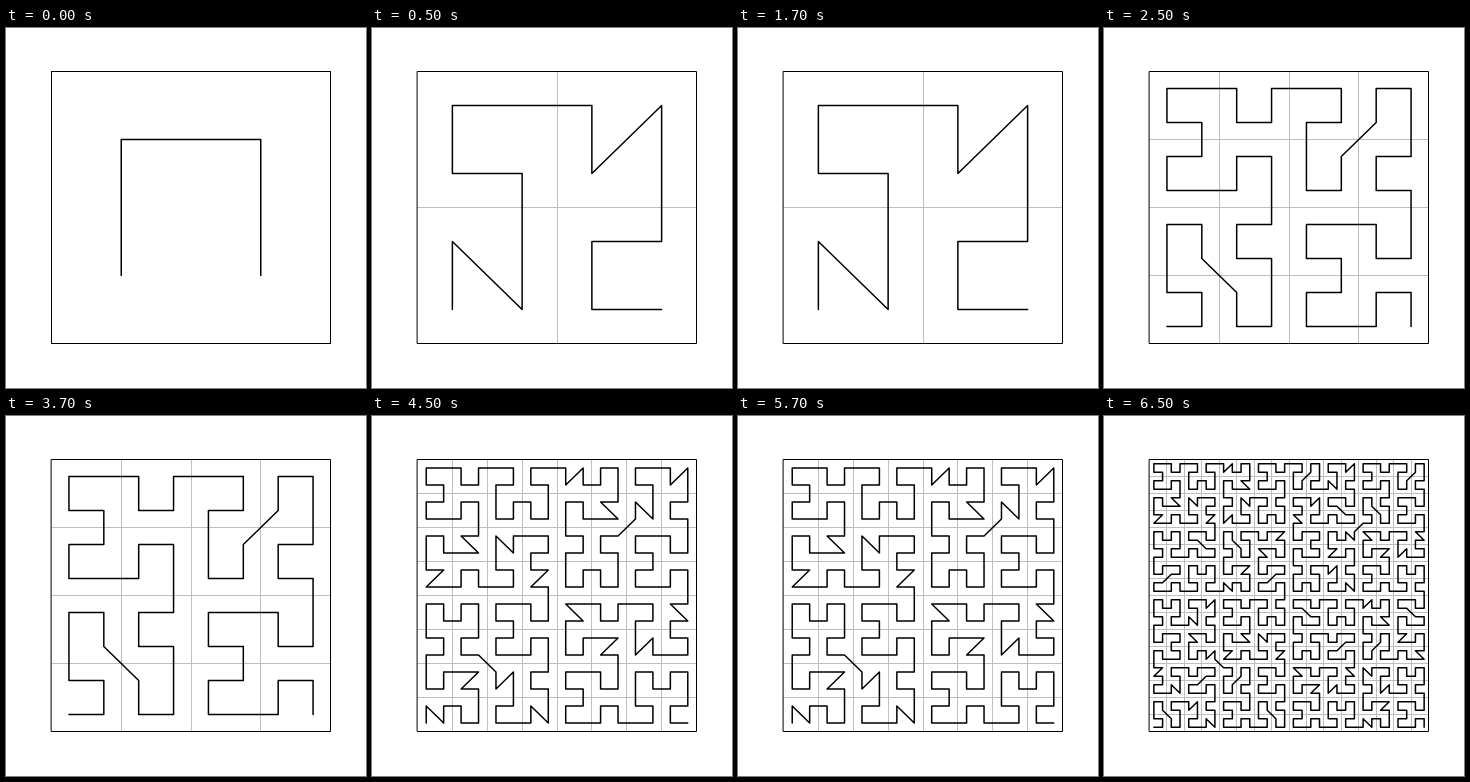
Write an HTML page with a canvas that moves like this. It is 360 px wide and 360 px high and loops after 8000 ms.

```html
<!DOCTYPE html>
<html lang="en">
<head>
<meta charset="utf-8">
<title>Space-filling curve</title>
<style>
  html, body { margin: 0; width: 100%; height: 100%; overflow: hidden; background: #fff; }
  canvas { display: block; }
</style>
</head>
<body>
<canvas id="stage" width="360" height="360"></canvas>
<script>
const ctx = document.getElementById('stage').getContext('2d');
const LOOP = 8000, FIRST = 500, STEP = 2000;
const BOX = { x: 45.5, y: 43.5, w: 279, h: 272 };

// Child rule: pattern, quadrant (u, v), start corner (u, v), x = swap axes, r = run backwards
const RULES = {
  A: ['N0000', 'Y1001x', 'N1110', 'Y0111x'],
  C: ['N0000x', 'A1001x', 'N1110', 'C0101xr'],
  Y: ['C0000x', 'A1001r', 'Y1100', 'Y0111x'],
  N: ['C0000x', 'Y1001r', 'A0110', 'Y1101x']
};

// p is the start corner of the cell, u and v are its edge vectors
function walk(type, p, u, v, depth, back, out) {
  const at = (a, b) => [p[0] + a * u[0] + b * v[0], p[1] + a * u[1] + b * v[1]];
  if (!depth) {
    out.push(at(0.5, 0.5));
    return out;
  }
  const rules = back ? RULES[type].slice().reverse() : RULES[type];
  for (const rule of rules) {
    const [i, j, s, t] = [...rule.slice(1, 5)].map(Number);
    const cu = u.map(n => n * (0.5 - s));
    const cv = v.map(n => n * (0.5 - t));
    const swap = rule.includes('x');
    walk(rule[0], at((i + s) / 2, (j + t) / 2), swap ? cv : cu, swap ? cu : cv,
      depth - 1, back !== rule.includes('r'), out);
  }
  return out;
}

const curves = [1, 2, 3, 4, 5].map(order =>
  walk('A', [BOX.x, BOX.y + BOX.h], [0, -BOX.h], [BOX.w, 0], order, false, []));

function drawGrid(n) {
  const snap = c => Math.floor(c) + 0.5;
  ctx.beginPath();
  for (let i = 1; i < n; i++) {
    const x = snap(BOX.x + BOX.w * i / n), y = snap(BOX.y + BOX.h * i / n);
    ctx.moveTo(x, BOX.y);
    ctx.lineTo(x, BOX.y + BOX.h);
    ctx.moveTo(BOX.x, y);
    ctx.lineTo(BOX.x + BOX.w, y);
  }
  ctx.lineWidth = 1;
  ctx.strokeStyle = '#bebebe';
  ctx.stroke();
}

function draw(index) {
  ctx.fillStyle = '#fff';
  ctx.fillRect(0, 0, 360, 360);
  drawGrid(2 ** index);
  ctx.strokeStyle = '#000';
  ctx.strokeRect(BOX.x, BOX.y, BOX.w, BOX.h);
  ctx.beginPath();
  for (const [x, y] of curves[index]) ctx.lineTo(x, y);
  ctx.lineWidth = 1.5;
  ctx.lineJoin = 'round';
  ctx.lineCap = 'round';
  ctx.stroke();
}

const start = performance.now();
let shown = -1;
function tick() {
  const t = (performance.now() - start) % LOOP;
  const index = t < FIRST ? 0 : 1 + Math.floor((t - FIRST) / STEP);
  if (index !== shown) draw(shown = index);
  requestAnimationFrame(tick);
}
tick();
</script>
</body>
</html>
```
